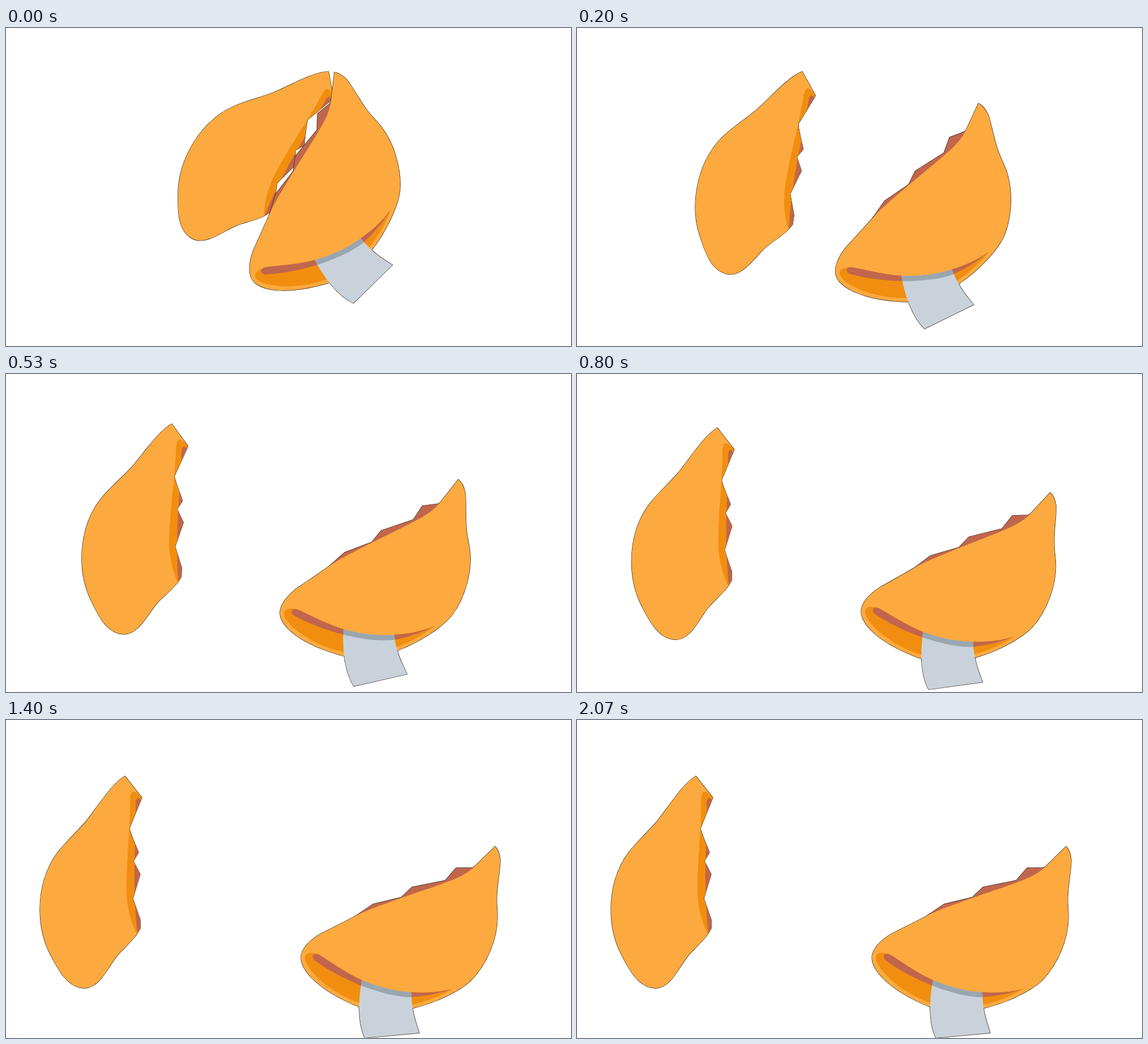
These frames come from a looping animation (998x561 px, 2140 ms). An HTML page:

```html
<!DOCTYPE html>
<html lang="en">
<head>
<meta charset="utf-8">
<title>Fortune cookie</title>
<style>
  html, body { margin: 0; width: 100%; height: 100%; overflow: hidden; background: #fff; }
  svg { display: block; width: 100%; height: 100%; }
  .edge { fill: none; stroke: #2b2118; stroke-width: 1.3; stroke-linejoin: round; }
  .dough { fill: #fca93f; }
  .inner { fill: #f18e0f; }
  .crust { fill: #c1664c; }
  .paper { fill: #c9d2da; }
  .shade { fill: #9aa6af; }
</style>
</head>
<body>
<svg viewBox="0 0 998 561">
  <defs>
    <path id="half" d="M210 99L240 137L218 191C221 205 229 220 234 234L225 249L237 272L224 315L237 352V368L231 378
      C222 391 207 403 197 415C181 434 166 473 139 473C108 473 91 438 78 413C65 388 60 360 60 334
      C60 300 69 262 92 233C109 211 126 197 142 178C162 153 188 111 210 99Z"/>
    <path id="body" d="M864 223L826 260C805 279 785 284 698 314C665 326 640 334 617 346C590 360 570 370 556 377
      C535 389 521 405 521 419C521 440 548 475 623 506C650 514 690 516 720 508C755 500 800 480 822 459
      C850 430 868 385 868 348C868 335 866 322 867 310C868 285 873 265 873 247C872 236 868 227 864 223Z"/>
    <path id="jags" d="M826 260L822 261H795L776 283L717 295L698 313L648 325L617 346L640 360L700 340L810 300Z"/>
    <path id="slip" d="M629 459C660 472 690 479 716 480C717 520 725 535 730 552L634 561C621 535 622 490 629 459Z"/>
    <path id="lip" d="M789 474C765 481 740 482 716 480C690 479 660 472 629 459C600 446 573 426 553 414
      C545 410 538 415 544 423C570 443 600 457 626 468C660 481 690 489 716 489C745 487 770 481 789 474Z"/>
    <clipPath id="inHalf"><use href="#half"/></clipPath>
    <clipPath id="inSlip"><use href="#slip"/></clipPath>
  </defs>
  <g id="left">
    <use href="#half" class="edge"/>
    <use href="#half" class="dough"/>
    <g clip-path="url(#inHalf)">
      <path class="inner" d="M240 137C231 128 221 118 219 138C220 190 212 250 213 305C214 335 223 362 231 378H250V137Z"/>
      <path class="crust" d="M238 141C233 134 229 138 229 150C229 200 226 260 227 300C228 335 230 360 232 377L250 380V150Z"/>
    </g>
  </g>
  <g id="right">
    <g class="edge"><use href="#jags"/><use href="#body"/><use href="#slip"/></g>
    <use href="#jags" class="crust"/>
    <use href="#body" class="dough"/>
    <path class="inner" d="M541 411C530 409 526 416 529 425C535 445 575 482 624 499C660 508 700 508 718 502
      C745 496 768 487 789 474C765 480 740 482 716 480C690 479 660 472 629 459C600 446 570 424 552 414C548 412 545 411 541 411Z"/>
    <use href="#lip" class="crust"/>
    <use href="#slip" class="paper"/>
    <g clip-path="url(#inSlip)"><use href="#lip" class="shade"/></g>
  </g>
</svg>
<script>
const LOOP = 2140, STEPS = 32, FPS = 15;
const keys = [0, 3, 8, 12, 16, 21];

// Offsets from the resting pose at each key step, and the pivot they apply to.
const pieces = [
  { id: 'left', cx: 150, cy: 290,
    x: [276, 157.6, 75.7, 36.7, 8, 0],
    y: [-74, -34.4, -13.4, -4.4, -1, 0],
    turn: [28.5, 9.4, 2.2, 0.4, 0, 0] },
  { id: 'right', cx: 700, cy: 390,
    x: [-142.6, -85, -42.1, -20.5, -5.1, 0],
    y: [-79, -42.7, -17.3, -7, -1.1, 0],
    turn: [-38.95, -20.8, -7.4, -2.5, -0.3, 0] }
];

// Smooth monotone curve through the key values, coming to rest at the last.
function curve(v) {
  const h = keys.slice(1).map((k, i) => k - keys[i]);
  const d = h.map((w, i) => (v[i + 1] - v[i]) / w);
  const m = keys.map((_, i) => {
    if (i === 0) return ((2 * h[0] + h[1]) * d[0] - h[0] * d[1]) / (h[0] + h[1]);
    if (i === h.length || d[i - 1] * d[i] <= 0) return 0;
    const a = 2 * h[i] + h[i - 1], b = h[i] + 2 * h[i - 1];
    return (a + b) / (a / d[i - 1] + b / d[i]);
  });
  return s => {
    if (s >= keys[h.length]) return v[h.length];
    const i = keys.findIndex(k => k > s) - 1;
    const w = h[i], u = (s - keys[i]) / w, r = 1 - u;
    return r * r * (1 + 2 * u) * v[i] + u * u * (3 - 2 * u) * v[i + 1]
      + w * u * r * (r * m[i] - u * m[i + 1]);
  };
}

for (const p of pieces) {
  p.node = document.getElementById(p.id);
  for (const key of ['x', 'y', 'turn']) p[key] = curve(p[key]);
}

function draw(now) {
  // Steps begin at 1/15 s intervals rounded to 10 ms, hence the 5 ms lead.
  const step = Math.min(STEPS - 1, Math.floor((now % LOOP + 5) * FPS / 1000));
  for (const { node, cx, cy, x, y, turn } of pieces) {
    node.setAttribute('transform',
      `translate(${x(step)} ${y(step)}) rotate(${turn(step)} ${cx} ${cy})`);
  }
}

const start = performance.now();
function tick() {
  draw(performance.now() - start);
  requestAnimationFrame(tick);
}
tick();
</script>
</body>
</html>
```
